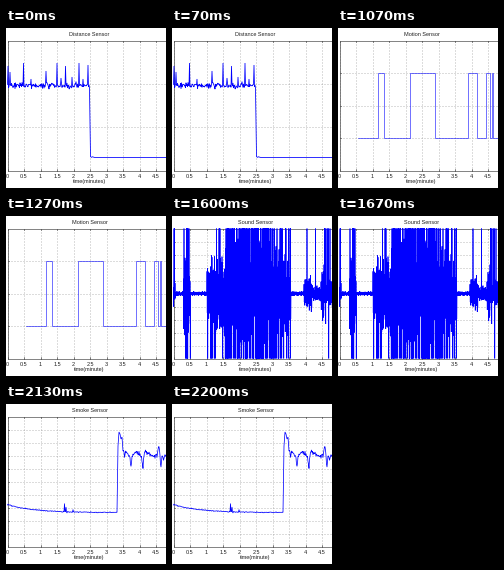
A matplotlib script that plays this animation: 160 px wide and 160 px high, repeating every 2.67 s.

```python
import numpy as np
import matplotlib.pyplot as plt
from matplotlib.animation import FuncAnimation

SIZE, DPI = 160, 100
PX = 72 / DPI
LEFT, RIGHT, TOP, BOTTOM = 1.5, 166.5, 12.5, 142.5
PER_MINUTE = 33
BLUE = "#0000ff"
STEP_MS, LOOP_MS = 10, 2670
STARTS = [0, 530, 1070, 1600, 2130]

plt.rcParams["font.family"] = "Liberation Sans"
fig = plt.figure(figsize=(SIZE / DPI, SIZE / DPI), dpi=DPI, facecolor="white")


def noise(seed, count, spread):
    return np.random.default_rng(seed).normal(0, spread, count)


def make_panel(title, xlabel, divisions):
    ax = fig.add_axes([0, 0, 1, 1])
    ax.set(xlim=(0, SIZE), ylim=(SIZE, 0))
    ax.axis("off")
    grid = dict(color="#777777", lw=0.5 * PX, dashes=(2, 4), zorder=1)
    frame = dict(color="#444444", lw=0.65 * PX, zorder=2)

    for i in range(10):
        x = LEFT + i * PER_MINUTE / 2
        ax.plot([x, x], [TOP, BOTTOM], **grid)
        for y, end in ((TOP, TOP + 1.5), (BOTTOM, BOTTOM - 1.5)):
            ax.plot([x, x], [y, end], **frame)
        ax.text(x, 148.2, f"{i / 2:g}", size=5.5 * PX, color="#222222",
                ha="center", va="center")
    for y in np.linspace(TOP, BOTTOM, divisions + 1)[1:-1]:
        ax.plot([LEFT, RIGHT], [y, y], **grid)
        ax.plot([LEFT, LEFT + 1.5], [y, y], **frame)
    ax.plot([RIGHT, LEFT, LEFT, RIGHT], [TOP, TOP, BOTTOM, BOTTOM], **frame)

    label = dict(size=5.5 * PX, color="#222222", ha="center", va="center")
    ax.text(83.5, 6.5, title, **label)
    ax.text(83.5, 153.5, xlabel, **label)
    return ax


def trace(ax, x, y, width=0.8):
    ax.plot(x, np.clip(y, TOP, BOTTOM), color=BLUE, lw=width * PX,
            solid_joinstyle="miter", zorder=3)


def distance_panel():
    ax = make_panel("Distance Sensor", "time(minutes)", 3)
    x = np.arange(LEFT, 84, 0.5)
    y = 57.5 + noise(4, len(x), 1.5)
    peaks = {2: 38, 4: 44, 17.5: 35, 25: 51, 40: 43, 51: 35, 55: 50,
             59.5: 38, 66: 49, 73: 35, 77: 51, 82: 37}
    for px, py in peaks.items():
        y[np.abs(x - px).argmin()] = py
    tail = np.arange(84.5, 162, 1)
    tail_y = np.where(tail < 88, 129 + 0.8 * np.cos(tail * 3), 129.4)
    trace(ax, np.r_[x, tail], np.r_[y, tail_y])
    return ax


def light_panel():
    ax = make_panel("Light Sensor", "time(minutes)", 10)
    x = np.arange(LEFT, 108, 0.5)
    rough = np.where((x < 24) | (x > 88), 0.45, 0.15)
    y = 130.3 + noise(7, len(x), 1) * rough
    tail = np.arange(111, 162, 0.5)
    tail_y = 39.5 + 2 * np.exp(-(tail - 111) / 8) + noise(8, len(tail), 0.3)
    trace(ax, np.r_[x, 108.5, 109, 109.5, 110, tail],
          np.r_[y, 132, 136, 100, 44, tail_y])
    return ax


def motion_panel():
    ax = make_panel("Motion Sensor", "time(minute)", 4)
    low, high = 109.8, 44.5
    edges = [39.5, 45.5, 71.5, 96.5, 129.5, 138.5, 147.5, 151.5, 153.5, 154.8]
    x = np.r_[20, np.repeat(edges, 2), 162]
    levels = [low if i % 2 == 0 else high for i in range(len(edges) + 1)]
    trace(ax, x, np.repeat(levels, 2), 0.55)
    return ax


def sound_panel():
    ax = make_panel("Sound Sensor", "time(minutes)", 10)
    rng = np.random.default_rng(12)
    # start, end, typical swing, chance of a full-height swing
    bursts = [(1.5, 3.5, 12, 0.25), (3.5, 11.5, 2, 0), (11.5, 18.5, 40, 0.4),
              (18.5, 35, 2, 0), (35, 38, 22, 0.3), (38, 52, 34, 0.16),
              (52, 105, 48, 0.6), (105, 116, 40, 0.3), (116, 119, 24, 0.35),
              (119, 132, 2, 0), (132, 140, 17, 0.04), (140, 149, 7, 0.04),
              (149, 154, 28, 0.2), (154, 162, 12, 0.1)]
    xs, ys = [], []
    for start, end, swing, full in bursts:
        x = np.arange(start, end, 0.25)
        size = swing * rng.uniform(0.3, 1.15, len(x))
        size[rng.random(len(x)) < full] = 80
        sign = np.where(np.arange(len(x)) % 2, 1, -1)
        xs.append(x)
        ys.append(77.5 + sign * size)
    trace(ax, np.concatenate(xs), np.concatenate(ys), 0.7)
    return ax


def smoke_panel():
    ax = make_panel("Smoke Sensor", "time(minute)", 10)
    x = np.arange(LEFT, 111.5, 0.5)
    y = 108.5 - 8.5 * np.exp(-x / 25) + noise(3, len(x), 0.25)
    for px, py in ((58.5, 99.5), (60, 103), (61, 109), (67, 105.5)):
        y[np.abs(x - px).argmin()] = py
    knots = [112, 113, 114, 115, 116, 117, 118.5, 120, 124, 125, 126, 128,
             132, 135, 137, 138, 140, 145, 149, 151, 153, 155, 156, 158, 162]
    shape = [42, 28, 30, 35, 33, 47, 51, 49, 53, 65, 54, 50,
             49, 53, 63, 51, 46, 51, 53, 52, 42, 65, 52, 55, 49]
    tail = np.arange(112, 162, 0.5)
    tail_y = np.interp(tail, knots, shape)
    tail_y += noise(5, len(tail), 1.6) * (tail > 117)
    trace(ax, np.r_[x, tail], np.r_[y, tail_y], 0.75)
    return ax


panels = [distance_panel(), light_panel(), motion_panel(), sound_panel(),
          smoke_panel()]


def draw(frame):
    current = np.searchsorted(STARTS, frame * STEP_MS, side="right") - 1
    for i, panel in enumerate(panels):
        panel.set_visible(i == current)
    return panels


animation = FuncAnimation(fig, draw, frames=LOOP_MS // STEP_MS,
                          interval=STEP_MS, repeat=True, repeat_delay=0)
plt.show()
```
